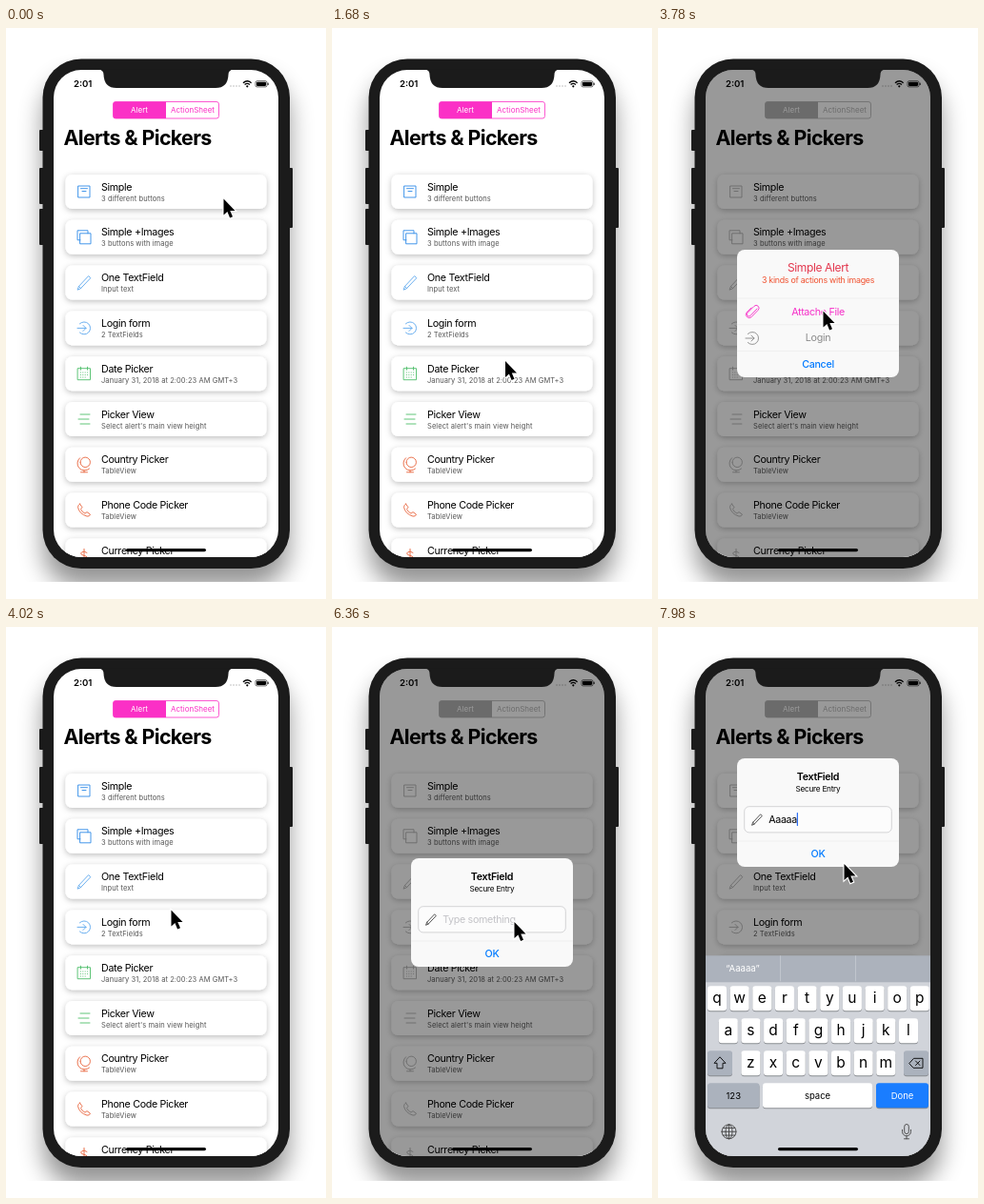
Recreate the animation shown at these times as an HTML page. Size 336x600 px, loop 8000 ms.

```html
<!DOCTYPE html>
<html lang="en">
<head>
<meta charset="utf-8">
<title>Alerts &amp; Pickers</title>
<style>
html, body { margin: 0; width: 100%; height: 100%; overflow: hidden; background: #fff; }
svg { display: block; width: 336px; height: 600px; font-family: Inter, Roboto, sans-serif; }
.tight { letter-spacing: -.03em; }
.wide { letter-spacing: .01em; }
.icon { fill: none; stroke: currentColor; stroke-width: .9; stroke-linejoin: round; stroke-linecap: round; }
.dimmed .tint { color: #b2b2b2; }
.pink { color: #fb30c6; }
</style>
</head>
<body>
<svg id="stage" viewBox="0 0 336 600"></svg>
<script>
const BLUE = '#007aff', PINK = '#f62fc8', BODY = '#1b1b1b';
const LOOP = 8000, STEP = 60;

const icons = {
  box: 'M-6-6H6V6H-6ZM-3.5-3.3H3.5M-2-.5H2',
  copy: 'M-4-4H7V7H-4ZM-4 3H-7V-7H4V-4',
  pencil: 'M-6.8 7.2-5.5 3.8 4.6-7 6.8-4.9-3.4 5.9ZM-5.5 3.8-3.4 5.9',
  login: 'M-4.6-4.6A6.5 6.5 0 1 1-4.6 4.6M-7 0H2M-1-3 2 0-1 3',
  calendar: 'M-6.5-5.5H6.5V6.5H-6.5ZM-3.5-7V-4M3.500-7V-4M-3.700-1.200h.2m2.200 0h.2m2.200 0h.2m2.200 0h.2M-3.700 1.300h.2m2.200 0h.2m2.200 0h.2m2.200 0h.2M-3.700 3.800h.2m2.200 0h.2m2.200 0h.2',
  list: 'M-4-5H6M-6 0H5M-4 5H6',
  globe: 'M-4-2.5a5.2 5.2 0 1 0 10.400 0a5.200 5.200 0 1 0-10.400 0M-4.500-7A7 7 0 0 0 5.500 4.300M0 6V8M-3.500 8H3.500',
  phone: 'M-4.5-6.5-2-3-3.5-1Q-2 2.3 1 3.5L3 2 6.5 4.5Q5.5 7 3 6.5Q-5 4-6.5-3Q-6.5-5-4.5-6.5Z',
  money: 'M3-3Q0-5.5-2.5-3.5T0 0T2.5 3.5T-3 3M0-7V7',
  clip: 'M5-3-2 4.3A2 2 0 0 1-5 1.4L2-5.7A2.9 2.9 0 0 1 6.2-1.7L-1 5.8A3.5 3.5 0 0 1-6 1L-1-4',
  world: 'M-7.5 0a7.5 7.5 0 1 0 15 0a7.5 7.5 0 1 0-15 0M-3.5 0a3.5 7.5 0 1 0 7 0a3.5 7.5 0 1 0-7 0M-7.5 0H7.5M0-7.5V7.5M-6.3-3.8H6.3M-6.3 3.8H6.3',
  mic: 'M-2.3-5.5a2.3 2.3 0 0 1 4.6 0V0a2.3 2.3 0 0 1-4.6 0ZM-4.5-2V0A4.5 4.5 0 0 0 4.5 0V-2M0 4.5V7.5M-2.5 7.5H2.5',
};

const icon = (name, x, y, color, scale = 1) =>
  `<path class="icon tint" color="${color}" d="${icons[name]}" transform="translate(${x} ${y}) scale(${scale})"/>`;
const rect = (x, y, w, h, r, fill, extra = '') =>
  `<rect x="${x}" y="${y}" width="${w}" height="${h}" rx="${r}" fill="${fill}" ${extra}/>`;
const text = (x, y, size, str, fill = '#000', extra = '') =>
  `<text x="${x}" y="${y}" font-size="${size}" fill="${fill}" ${extra}>${str}</text>`;
const mid = (y, size, str, fill, weight = 400) =>
  text(168, y, size, str, fill, `text-anchor="middle" class="tight" font-weight="${weight}"`);
const line = y => `<path d="M83 ${y}H253" stroke="#000" stroke-opacity=".08" stroke-width=".6"/>`;

const rows = [
  ['Simple', '3 different buttons', 'box', '#2f8ce8'],
  ['Simple +Images', '3 buttons with image', 'copy', '#2f8ce8'],
  ['One TextField', 'Input text', 'pencil', '#5ba6ee'],
  ['Login form', '2 TextFields', 'login', '#5ba6ee'],
  ['Date Picker', 'January 31, 2018 at 2:00:23 AM GMT+3', 'calendar', '#4fbf6a'],
  ['Picker View', "Select alert's main view height", 'list', '#4fbf6a'],
  ['Country Picker', 'TableView', 'globe', '#e8623a'],
  ['Phone Code Picker', 'TableView', 'phone', '#e8623a'],
  ['Currency Picker', 'TableView', 'money', '#e8623a'],
].map(([title, sub, name, color], i) =>
  `<g transform="translate(0 ${i * 47.8})">
    ${rect(62.5, 154, 211, 36, 7, '#fff', 'filter="url(#cardShadow)"')}
    ${icon(name, 82, 172, color)}
    ${text(100, 170.7, 10.7, title, '#000', 'class="tight"')}
    ${text(100, 181.5, 7.5, sub, '#555', 'class="wide"')}
  </g>`).join('');

const segment = `<g class="tint pink">
  ${rect(112.5, 77.5, 111, 17.5, 2.5, '#fff', 'stroke="currentColor" stroke-width=".8"')}
  <path d="M168 77.5H115a2.5 2.5 0 0 0-2.5 2.5V92.5a2.5 2.5 0 0 0 2.5 2.5H168Z" fill="currentColor"/>
  ${text(140, 89.2, 8, 'Alert', '#fff', 'text-anchor="middle"')}
  ${text(196, 89.2, 8, 'ActionSheet', 'currentColor', 'text-anchor="middle"')}</g>`;

const status = text(71, 62.3, 9.6, '2:01', '#000', 'font-weight="600"') +
  [236, 239, 242, 245].map(x => `<circle cx="${x}" cy="61" r=".8" fill="#bbb"/>`).join('') +
  `<path d="M249 57.8Q253.3 53.6 257.6 57.8M250.6 59.6Q253.3 57.2 256 59.6" fill="none" stroke="#000" stroke-width="1.3"/>
  <circle cx="253.3" cy="61.3" r="1.1"/>` +
  rect(262, 55.7, 12, 6.2, 1.6, 'none', 'stroke="#000" stroke-width=".6"') +
  rect(263, 56.7, 10, 4.2, .8, '#000') + rect(274.6, 57.5, 1, 2.6, .5, '#000');

const panel = (id, y, h, body) => `<g id="${id}">${rect(83, y, 170, h, 8, '#f9f9f9')}${body}</g>`;
const dividers = [284, 311.7, 339.4].map(line).join('');
const alerts =
  panel('alert1', 233, 134, dividers +
    mid(256, 10.7, 'Simple Alert', '#000', 600) +
    mid(268.3, 8.3, '3 kinds of actions', '#000') +
    mid(301.5, 10.7, 'Default', BLUE) +
    mid(329.4, 10.7, 'Destructive', '#ff3b30') +
    mid(357, 10.7, 'Cancel', BLUE, 600)) +
  panel('alert2', 233, 134, dividers +
    mid(256, 12, 'Simple Alert', '#e3364d') +
    mid(268.3, 8.8, '3 kinds of actions with images', '#f0512f') +
    icon('clip', 99, 298, PINK) +
    icon('login', 99, 326, '#888') +
    mid(301.5, 10.7, 'Attache File', PINK) +
    mid(329.4, 10.7, 'Login', '#8a8a8a') +
    mid(357, 10.7, 'Cancel', BLUE, 500)) +
  panel('alert3', 243, 114, line(330) +
    mid(266, 10.7, 'TextField', '#000', 600) +
    mid(278.3, 8.2, 'Secure Entry') +
    rect(90.7, 293.7, 154.6, 27.2, 5, '#fcfcfc', 'stroke="#c9c9cc" stroke-width=".8"') +
    icon('pencil', 104, 307.3, '#111', .78) +
    text(116.2, 311.2, 10.7, '', '#000', 'id="entry" class="tight"') +
    rect(0, 300, 1.2, 14, .5, '#2a6df4', 'id="caret"') +
    mid(346.7, 10.7, 'OK', BLUE, 500));

const key = (x, y, w, fill, label = '', color = '#000', id = '') =>
  rect(x, y + 1, w, 26, 3, '#898c91') + rect(x, y, w, 26, 3, fill, id) +
  text(x + w / 2, y + 16.6, 9.5, label, color, 'text-anchor="middle"');
const letters = ['QWERTYUIOP', 'ASDFGHJKL', 'ZXCVBNM'].map((row, r) =>
  [...row].map((c, i) => {
    const x = [52, 63.8, 87.4][r] + i * 23.65, y = 381 + 34 * r;
    return key(x, y, 20, '#fff') +
      text(x + 10, y + 18, 14, c, '#000', 'class="letter" text-anchor="middle"');
  }).join('')).join('');
const keyboard = `<g id="keyboard">
  ${rect(50, 376, 236, 190, 0, '#d1d4da')}
  ${rect(50, 349, 236, 28, 0, '#acb2bc')}
  <path d="M128.5 349V376M207.5 349V376" stroke="#c9cdd4" stroke-width=".7"/>
  ${text(89, 366, 9.6, '', '#fff', 'id="hint" text-anchor="middle"')}
  ${letters}
  ${key(52, 449, 26, '#fff', '', '#000', 'id="shift"')}
  <path id="arrow" d="M65 455.5 71 462H68V467.5H62V462H59Z" stroke="#000" stroke-width=".9" stroke-linejoin="round"/>
  ${key(258, 449, 26, '#abb2bd')}
  <path d="M264 462 268.5 457H278V467H268.5ZM270.5 459.7 275 464.3M275 459.7 270.5 464.3" class="icon" color="#000"/>
  ${key(52, 483, 54.5, '#abb2bd', '123')}
  ${key(110, 483, 115, '#fff', 'space')}
  ${key(229, 483, 55, '#1a7dff', 'Done', '#fff')}
  ${icon('world', 74.5, 534, '#444')}
  ${icon('mic', 261, 534, '#444')}</g>`;

const $ = id => document.getElementById(id);
$('stage').innerHTML = `
<defs>
  <filter id="cardShadow" x="-10%" y="-40%" width="120%" height="200%">
    <feDropShadow dx="0" dy="1.8" stdDeviation="3" flood-opacity=".26"/></filter>
  <filter id="glow" x="-30%" y="-20%" width="160%" height="140%"><feGaussianBlur stdDeviation="13"/></filter>
  <clipPath id="photo"><rect x="12" y="18" width="312" height="564"/></clipPath>
  <clipPath id="screen"><rect x="50" y="44" width="236" height="512" rx="29"/></clipPath>
</defs>
<g clip-path="url(#photo)">${rect(39, 52, 258, 536, 40, '#000', 'opacity=".42" filter="url(#glow)"')}</g>
${[[35, 107, 22], [35, 147, 38], [35, 190, 38], [296, 147, 63]].map(([x, y, h]) => rect(x, y, 5, h, 1, BODY)).join('')}
${rect(38.5, 32.5, 259.5, 535.5, 40.5, BODY)}
<g clip-path="url(#screen)">
  ${rect(50, 44, 236, 512, 0, '#fff')}
  <g id="page">
    ${status}${segment}
    ${text(60.5, 123, 21.4, 'Alerts &amp; Pickers', '#000', 'class="tight" font-weight="700"')}
    ${rows}
  </g>
  ${rect(50, 44, 236, 512, 0, '#000', 'id="shade"')}
  ${alerts}${keyboard}
  ${rect(126, 547, 84, 3.2, 1.6, '#000')}
</g>
<path d="M97 43.5Q102.5 44 102.5 49Q103 63 116 63H220Q233 63 233.5 49Q233.5 44 239 43.5Z" fill="${BODY}"/>
<path id="cursor" d="M0 0V17L3.9 13.5 6.6 20 9.5 18.8 6.8 12.4H12Z" stroke="#fff" stroke-width="2.2" paint-order="stroke"/>`;

// time, alert number, opacity, scale
const shows = [[0, 0, 0, 1], [360, 1, .6, 1.06], [420, 1, 1, 1], [1560, 1, .5, 1], [1620, 0, 0, 1],
  [2820, 2, 1, 1], [3900, 2, .6, 1], [3960, 2, .25, 1], [4020, 0, 0, 1],
  [5100, 3, .5, 1.1], [5220, 3, .95, 1.024], [5280, 3, 1, 1]];
// time, alert shift, keyboard shift
const lifts = [[0, 0, 220], [6660, -55, 97], [6900, -103, 0], [7140, -105, -3.7]];
// time, x, y of the pointer tip
const path = [[0, 228.5, 179.5], [780, 228.5, 179.5], [840, 221, 202.5], [1320, 182, 350], [1740, 182, 350],
  [2220, 192, 225.5], [2940, 192, 225.5], [3420, 173.5, 297.5], [4380, 173.5, 297.5], [4560, 174.5, 274.5],
  [5580, 174.5, 274.5], [6360, 191.5, 310], [7380, 191.5, 310], [7980, 195.5, 249]];
const strokes = [7140, 7440, 7560, 7740, 7860];

const last = (list, t) => list.filter(e => e[0] <= t).pop();
const ease = p => p * p * (3 - 2 * p);

function pointer(t) {
  const a = last(path, t), b = path[path.indexOf(a) + 1];
  if (!b) return [a[1], a[2]];
  const p = ease((t - a[0]) / (b[0] - a[0]));
  return [a[1] + (b[1] - a[1]) * p, a[2] + (b[2] - a[2]) * p];
}

function draw(now) {
  const t = Math.floor(now % LOOP / STEP) * STEP;
  const [, shown, alpha, scale] = last(shows, t);
  const [, rise, drop] = last(lifts, t);

  $('shade').setAttribute('opacity', alpha * .4);
  $('page').setAttribute('class', alpha > .5 ? 'dimmed' : '');
  for (const n of [1, 2, 3]) {
    const el = $('alert' + n);
    el.style.display = n === shown ? '' : 'none';
    el.setAttribute('opacity', alpha);
    el.setAttribute('transform',
      `translate(168 ${300 + (n === 3 ? rise : 0)}) scale(${scale}) translate(-168 -300)`);
  }

  const count = strokes.filter(s => s <= t).length;
  const typed = 'Aaaaa'.slice(0, count);
  const entry = $('entry');
  entry.textContent = typed || 'Type something';
  entry.setAttribute('fill', typed ? '#000' : '#c3c3c7');
  $('caret').setAttribute('x', 116 + (typed ? entry.getComputedTextLength() : 0));
  $('caret').style.display = t >= 6480 ? '' : 'none';

  $('keyboard').setAttribute('transform', `translate(0 ${drop})`);
  $('hint').textContent = typed && `“${typed}”`;
  document.querySelectorAll('.letter').forEach(el => {
    const c = el.textContent;
    el.textContent = count ? c.toLowerCase() : c.toUpperCase();
    el.setAttribute('font-size', count ? 15.5 : 14);
  });
  $('shift').setAttribute('fill', count ? '#abb2bd' : '#fff');
  $('arrow').setAttribute('fill', count ? 'none' : '#000');

  $('cursor').setAttribute('transform', `translate(${pointer(t)})`);
}

const start = performance.now();
function tick() {
  draw(performance.now() - start);
  requestAnimationFrame(tick);
}
tick();
</script>
</body>
</html>
```
